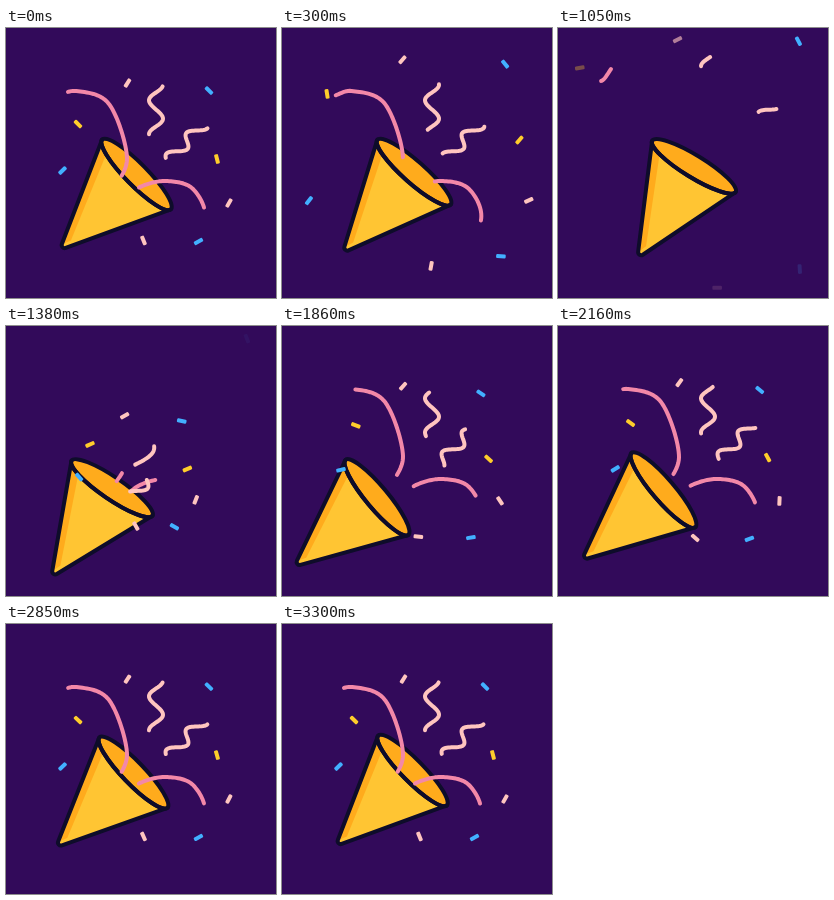
Recreate the animation shown at these times as an HTML page with a canvas. Size 270x270 px, loop 3.33 s.

```html
<!DOCTYPE html>
<html lang="en">
<head>
<meta charset="utf-8">
<title>Party popper</title>
<style>
  html, body { margin: 0; width: 100%; height: 100%; overflow: hidden; background: #320a5a; }
  canvas { display: block; width: 100vw; height: 100vh; }
</style>
</head>
<body>
<canvas></canvas>
<script>
const SIZE = 270, LOOP = 3330, BURST = 1170;
const BG = '#320a5a', INK = '#0e0c2a', YELLOW = '#ffc533', ORANGE = '#ffab1c';
const BLUE = '#42b0ff', BLUSH = '#ffc5bf', PINK = '#f388a8', GOLD = '#ffcd2b';

const canvas = document.querySelector('canvas');
const ctx = canvas.getContext('2d');
const dpr = window.devicePixelRatio || 1;
canvas.width = canvas.height = SIZE * dpr;

const clamp = (v, lo = 0, hi = 1) => Math.max(lo, Math.min(hi, v));
const mix = (a, b, k) => a + (b - a) * k;
const span = (t, from, to) => clamp((t - from) / (to - from));
const smooth = s => s * s * (3 - 2 * s);
const radians = deg => deg * Math.PI / 180;

// What is left of a move that starts and ends softly: 1 falling to 0.
const remaining = (t, tau) => t <= 0 ? 1 : (1 + t / tau) * Math.exp(-t / tau);

// Cone: leans forward, is kicked back by the burst, then creeps home.
function conePose(t) {
  const creep = from => smooth(1 - (1 - span(t, from, LOOP)) ** 1.4);
  const hit = 1 - (1 - span(t, BURST, 1650)) ** 2;
  const lean = span(t, 0, BURST) * (1 - hit);
  const kick = hit * (1 - creep(1650));
  const swing = smooth(span(t, BURST, 1880));
  return {
    x: 130.5 + 6 * lean - 38.5 * kick,
    y: 146.5 - 9 * lean + 27 * kick,
    tilt: t < BURST ? mix(45.5, 30, t / BURST) : mix(mix(30, 50.2, swing), 45.5, creep(1880))
  };
}

function drawCone(t) {
  const { x, y, tilt } = conePose(t);
  const half = 49, height = 108, depth = 11;
  ctx.save();
  ctx.translate(x, y);
  ctx.rotate(radians(tilt));

  const body = new Path2D();
  body.ellipse(0, 0, half, depth, 0, 0, Math.PI);
  body.arcTo(0, height, half, 0, 3);
  body.closePath();
  const shade = new Path2D(`M${-half} 0L-2.5 102L1 93L-35 9Z`);
  const mouth = new Path2D();
  mouth.ellipse(0, 0, half, depth, 0, 0, 2 * Math.PI);

  ctx.fillStyle = YELLOW;
  ctx.fill(body);
  ctx.fillStyle = ORANGE;
  ctx.fill(shade);
  ctx.fill(mouth);
  ctx.strokeStyle = INK;
  ctx.lineWidth = 4;
  ctx.lineJoin = 'round';
  ctx.stroke(body);
  ctx.stroke(mouth);
  ctx.restore();
}

// Confetti: `at` and `angle` hold in mid-air, `turn` is the rotation on the way there,
// `drift` the later travel, `spin` degrees per second while drifting.
const CORE = [112, 171];
const pieces = [
  { color: BLUSH, at: [121.5, 55], angle: -58, turn: -35, drift: [-2, -44], spin: 30, gone: 1250 },
  { color: BLUE, at: [203, 62.5], angle: 45, turn: 40, drift: [38, -50], spin: 17, gone: 1400 },
  { color: GOLD, at: [72, 96], angle: 45, turn: 84, drift: [-51, -57], spin: 120, gone: 1160 },
  { color: BLUE, at: [56.5, 142.5], angle: -45, turn: -115, drift: [-56, 57], spin: -22, gone: 730 },
  { color: GOLD, at: [211, 131], angle: 76, turn: 122, drift: [50, -36], spin: 183, gone: 1000 },
  { color: BLUSH, at: [223, 175], angle: 120, turn: 231, drift: [45, -5], spin: 120, gone: 920 },
  { color: BLUE, at: [192.5, 213.5], angle: -29, turn: -73, drift: [50, 28], spin: 110, gone: 1100 },
  { color: BLUSH, at: [137.5, 212.5], angle: 69, turn: 231, drift: [22, 48], spin: 105, gone: 1095 }
];

function drawPiece({ color, at, angle, turn, drift, spin, gone }, age, out) {
  const alpha = clamp((gone - out) / 320);
  if (alpha === 0) return;
  const spread = 1 - 0.69 * Math.exp(-age / 253);
  const away = 1 - remaining(out, 170);
  const [x, y] = at.map((v, i) => mix(CORE[i], v, spread) + drift[i] * away);
  ctx.save();
  ctx.globalAlpha = alpha;
  ctx.translate(x, y);
  ctx.rotate(radians(angle - turn * remaining(age, 270) + spin * out / 1000));
  ctx.fillStyle = color;
  ctx.beginPath();
  ctx.roundRect(-4.8, -2, 9.6, 4, 1.2);
  ctx.fill();
  ctx.restore();
}

// A wave around a straight axis; `bend` curves the axis towards the cone.
const wave = (origin, step, swing, bend) => u => origin.map((v, i) =>
  v + u * step[i] - swing[i] * Math.cos(Math.PI * u) + bend[i] * Math.min(u, 0) ** 2);

// Catmull-Rom curve through a few points.
const curveThrough = points => u => {
  const last = points.length - 1;
  const i = Math.min(Math.floor(u), last - 1), s = u - i;
  const [a, b, c, d] = [-1, 0, 1, 2].map(k => points[clamp(i + k, 0, last)]);
  return [0, 1].map(n => b[n] + s / 2 * (c[n] - a[n] +
    s * (2 * a[n] - 5 * b[n] + 4 * c[n] - d[n] + s * (3 * (b[n] - c[n]) + d[n] - a[n]))));
};

// Ribbons show a [tail, head] window of a curve: `hold` in mid-air,
// `back` how far behind it starts, `ahead` how far it runs on.
const ribbons = [
  { color: PINK, limits: [0, 8], hold: [0.55, 3.3], back: [0.55, 6.3], ahead: [6.45, 4.7],
    curve: curveThrough([[106, 162], [121, 130], [103, 76], [70, 63], [45, 68],
      [19, 48], [32, 44], [43, 53], [53, 41]]) },
  { color: PINK, limits: [0, 5], hold: [0.95, 3.65], back: [0.95, 4.7], ahead: [10.8, 5],
    curve: curveThrough([[118, 172], [134, 159], [160, 153], [187, 161], [199, 192], [175, 232]]) },
  { color: BLUSH, limits: [-2, 4.6], hold: [0, 2.9], back: [3.2, 8.2], ahead: [4, 1.7],
    curve: wave([150, 107], [0, -17], [7, 0.7], [-12, 4]) },
  { color: BLUSH, limits: [-4, 4.8], hold: [-0.3, 3], back: [8, 12.6], ahead: [4.3, 1.8],
    curve: wave([166, 128.5], [10, -10.4], [5.5, 3], [0, 0]) }
];

function drawRibbon({ color, limits, hold, back, ahead, curve }, age, out) {
  const behind = Math.exp(-age / 253), run = (out / 1050) ** 2.1;
  const [tail, head] = hold.map((u, i) =>
    clamp(u - back[i] * behind + ahead[i] * run, ...limits));
  if (head - tail < 0.05) return;
  const steps = Math.ceil((head - tail) * 16);
  ctx.beginPath();
  for (let i = 0; i <= steps; i++) ctx.lineTo(...curve(mix(tail, head, i / steps)));
  ctx.strokeStyle = color;
  ctx.lineWidth = 4;
  ctx.lineCap = ctx.lineJoin = 'round';
  ctx.stroke();
}

function draw(t) {
  ctx.setTransform(dpr, 0, 0, dpr, 0, 0);
  ctx.fillStyle = BG;
  ctx.fillRect(0, 0, SIZE, SIZE);
  drawCone(t);
  // The previous burst is still fading while the next one starts.
  for (const time of [t + LOOP, t]) {
    if (time < BURST) continue;
    const age = time - BURST, out = Math.max(0, time - LOOP);
    ribbons.forEach(r => drawRibbon(r, age, out));
    pieces.forEach(p => drawPiece(p, age, out));
  }
}

const start = performance.now();
function tick() {
  draw((performance.now() - start) % LOOP);
  requestAnimationFrame(tick);
}
tick();
</script>
</body>
</html>
```
